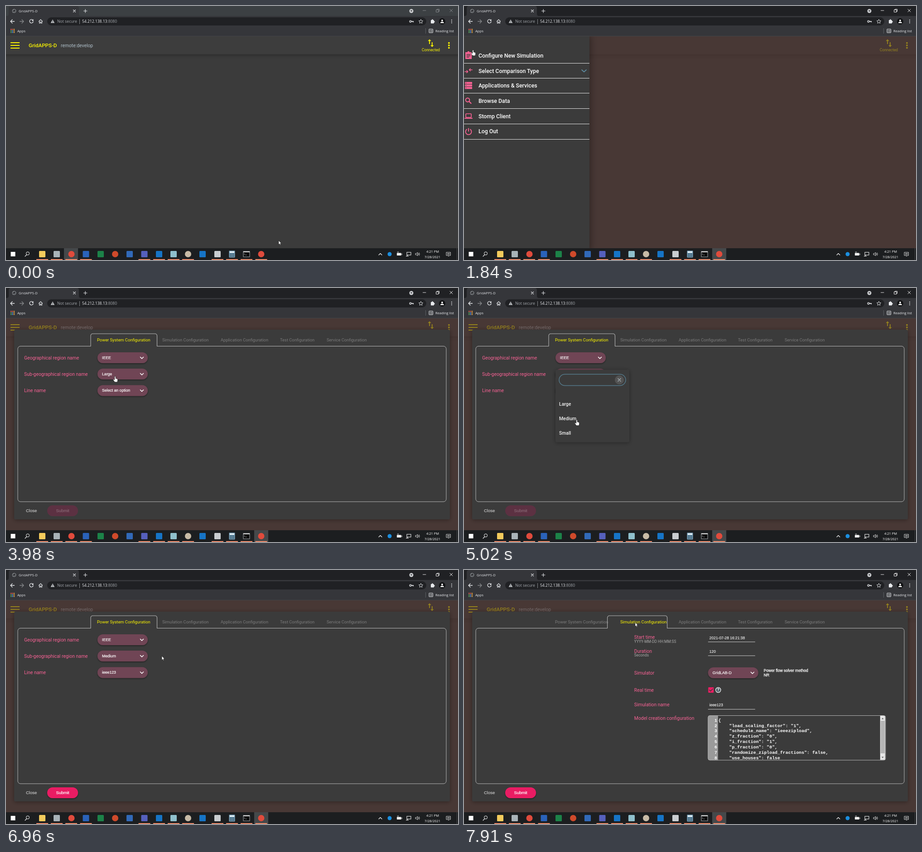
An HTML page that plays this animation: 998x561 px, repeating every 8 s.

```html
<!DOCTYPE html>
<html lang="en">
<head>
<meta charset="utf-8">
<title>Grid simulation setup</title>
<style>
  html, body { margin: 0; width: 100%; height: 100%; overflow: hidden; background: #3b3b3b; }
  svg { display: block; width: 100vw; height: 100vh; }
  text { white-space: pre; }
  .ui { font-family: "Open Sans", "Noto Sans", sans-serif; }
  .app { font-family: Roboto, sans-serif; }
  .ctl { font-family: "Liberation Sans", Arial, sans-serif; }
  .code { font-family: "Liberation Mono", monospace; font-weight: 700; }
  .line { fill: none; stroke-linecap: round; stroke-linejoin: round; }
</style>
</head>
<body>
<svg id="stage" viewBox="0 0 998 561" preserveAspectRatio="none" xmlns="http://www.w3.org/2000/svg"></svg>
<script>
const PAGE = '#3b3b3b', PINK = '#f76294', HOT = '#e91e63', YELLOW = '#fdf600', LIGHT = '#e8eaed';

// y is the vertical middle of the capitals
const text = (x, y, s, size, fill, font = 'app', extra = '') =>
  `<text class="${font}" x="${x}" y="${y + size * .36}" font-size="${size}" fill="${fill}" ${extra}>${s}</text>`;
const rect = (x, y, w, h, fill, r = 0, extra = '') =>
  `<rect x="${x}" y="${y}" width="${w}" height="${h}" rx="${r}" fill="${fill}" ${extra}/>`;
const dot = (x, y, r, fill, extra = '') => `<circle cx="${x}" cy="${y}" r="${r}" fill="${fill}" ${extra}/>`;
const line = (d, color = LIGHT, w = 1.1, extra = '') =>
  `<path class="line" d="${d}" stroke="${color}" stroke-width="${w}" ${extra}/>`;
const shape = (d, fill, extra = '') => `<path d="${d}" fill="${fill}" ${extra}/>`;
const group = (id, body, extra = '') => `<g id="${id}" ${extra}>${body}</g>`;
const bold = (color, w = .22) => `stroke="${color}" stroke-width="${w}"`;
const dots = (x, y, gap, r, fill) => [-1, 0, 1].map(i => dot(x, y + i * gap, r, fill)).join('');

function browser() {
  const grid = ['#e05a4e', '#e05a4e', '#e8a33c', '#54a65b', '#4d8fe0', '#e8a33c', '#54a65b', '#4d8fe0', '#e8a33c']
    .map((c, i) => rect(10 + i % 3 * 3.4, 50.5 + (i / 3 | 0) * 3.3, 2.3, 2.3, c)).join('');
  return `<rect id="strip" width="998" height="23"/>` +
    shape('M2 22Q6 22 6 17V5Q6 0 11 0H156Q161 0 161 5V17Q161 22 165 22Z', '#35363a') +
    rect(0, 22, 998, 45, '#35363a') + rect(0, 66.3, 998, .7, '#4a4b4e') +
    dot(18, 11, 4, 'none', 'stroke="#8c9094"') + line('M14.5 10q3-1 3.5-3M15 14q2-2 3-1t4-3', '#8c9094', .9) +
    text(28, 11, 'GridAPPS-D', 7.7, '#dfe1e5', 'ui') +
    line('M148.5 8.5l5 5m0-5l-5 5') + line('M171.5 11h7.5M175.2 7.3v7.5') +
    dot(895, 11, 4.5, '#c9cbce') + shape('M892.8 9.8h4.4l-2.2 2.8z', '#2a2b2e') +
    group('winCtl', line('M920.5 10h6.5M950 8.5h5v5h-5zM951.5 8.5v-1.5h5v5h-1.5M980 7l6 6m0-6l-6 6', 'currentColor', .9)) +
    line('M18.5 34H10M14 30l-4 4 4 4', LIGHT, 1.3) + line('M30.5 34H39M35 30l4 4-4 4', '#85878a', 1.3) +
    line('M59.3 31.2A4 4 0 1 0 60 34.5', LIGHT, 1.3) + shape('M60.5 29v4h-4z', LIGHT) +
    line('M72.5 34l4-4 4 4M73.6 33.5v4.5h2v-2.6h1.8V38h2v-4.5', LIGHT, 1.1) +
    rect(91, 25, 837, 18, '#202124', 9) +
    shape('M103 29.8l4.3 7.7h-8.6z', '#c4c7ca') + line('M103 32.5v2M103 36v.1', '#202124', .9) +
    text(113, 34, 'Not secure', 8.7, '#a5a9ae', 'ui') + rect(162, 29, 1, 11, '#85888c') +
    text(168, 34, '54.212.138.13<tspan fill="#a0a4a9">:8080</tspan>', 8.5, LIGHT, 'ui') +
    dot(893, 34, 1.9, 'none', `stroke="${LIGHT}" stroke-width="1.3"`) + line('M895 34h4.5v1.5M897.5 34v1', LIGHT, 1.3) +
    shape('M916 29.5l1.3 3 3.3.3-2.5 2.2.8 3.2-2.9-1.7-2.9 1.7.8-3.2-2.5-2.2 3.3-.3z', 'none', `stroke="${LIGHT}" stroke-width=".9"`) +
    rect(938, 31, 7, 7.5, LIGHT, 1) + dot(941.5, 30.8, 1.5, LIGHT) + dot(945.3, 34.7, 1.5, LIGHT) +
    dot(963, 34, 7, '#111214') + dot(963, 32, 1.9, '#fff') + shape('M959 37.8q0-3 4-3t4 3z', '#fff') +
    dots(984, 34, 3.3, .95, LIGHT) + grid +
    text(25, 55, 'Apps', 7.7, LIGHT, 'ui') + rect(926, 49, 1, 12, '#5a5c60') +
    rect(934, 51, 8.5, 8, 'none', .5, `stroke="${LIGHT}"`) + line('M936 53.5h.5m1.5 0h2.5M936 55.2h.5m1.5 0h2.5M936 57h.5m1.5 0h2.5', LIGHT, .8) +
    text(948, 55, 'Reading list', 7.66, LIGHT, 'ui');
}

function header() {
  return rect(-10, 67, 1018, 39.5, '#3e3e3e', 0, 'filter="url(#soft)"') +
    [80, 86, 92].map(y => rect(10, y, 20, 2, YELLOW)).join('') +
    text(50, 86.5, 'GridAPPS-D', 11.6, YELLOW, 'app', 'font-weight="500"') + text(121, 87, 'remote:develop', 10.35, '#b0c0ca') +
    shape('M9 3L5 7h3v7h2V7h3zM16 17v-7h-2v7h-3l4 4 4-4z', YELLOW, 'transform="translate(926.6 70.6) scale(.95)"') +
    text(918, 97, 'Connected', 8.35, YELLOW) + dots(978, 87, 5.3, 1.9, YELLOW);
}

const MENU = [[109.5, 'Configure New Simulation'], [143.5, 'Select Comparison Type'], [176, 'Applications &amp; Services'],
  [209.5, 'Browse Data'], [243.5, 'Stomp Client'], [277, 'Log Out']];
function drawer() {
  const icons =
    shape('M3 102h4.5a2.3 2.3 0 0 1 4.6 0H17v15H3z', PINK) + line('M6 107h8M6 110h8M6 113h5', PAGE, 1.3) +
    line('M2 145h6M6 142.5l2.5 2.5-2.5 2.5M18 141h-6M14 138.5l-2.5 2.5 2.5 2.5', PINK, 1.7) +
    [170, 175.5, 181].map(y => rect(2, y - 2.2, 16, 4.4, PINK, .8) + dot(4.5, y, .8, PAGE)).join('') +
    dot(8, 207.5, 4.3, 'none', `stroke="${PINK}" stroke-width="2"`) + line('M11.5 211l4 4', PINK, 2.3) +
    rect(4, 238, 12, 8, 'none', 1, `stroke="${PINK}" stroke-width="1.7"`) + rect(1, 247, 18, 1.9, PINK, .8) +
    line('M6 272.5a6.5 6.5 0 1 0 8 0M10 270.5v6', PINK, 1.9);
  return rect(0, 60, 277, 480, PAGE, 0, 'filter="url(#deep)"') +
    group('hover', rect(0, 93, 277, 33, '#594748') + dot(79, 109, 0, '#705f60', 'id="ripple" clip-path="url(#rowClip)"')) +
    icons + MENU.map(([y, s]) => text(32, y, s, 12.3, '#fff', 'app', 'font-weight="500"')).join('') +
    [126, 159, 192, 226, 260, 294].map(y => rect(0, y, 277, 1, '#e4e4e4')).join('') +
    line('M260 141l5 4.5 5-4.5', '#5d8ba0', 1.7);
}

const pick = (x, y, s, id = '') => rect(x, y - 12, 111, 24, '#704454', 12, 'filter="url(#lift)"') +
  text(x + 10, y - .5, s, 8.68, '#fff', 'ctl', `id="${id}" ${bold('#fff')}`) +
  line(`M${x + 94.5} ${y - 1.5}l3.5 3.5 3.5-3.5`, '#fff', 1.6);
const label = (y, s) => text(40, y, s, 10.4, PINK);
const field = (y, s) => text(206, y, s, 8.45, '#fff', 'ctl', bold('#fff', .1)) + rect(203, y + 8.8, 104, 1, '#c9c9c9');

const CODE = ['{', '    "load_scaling_factor": "1",', '    "schedule_name": "ieeezipload",', '    "z_fraction": "0",',
  '    "i_fraction": "1",', '    "p_fraction": "0",', '    "randomize_zipload_fractions": false,', '    "use_houses": false'];
function editor() {
  return rect(203, 321.5, 392, 98.5, PAGE, 4) + shape('M225 321.5H207q-4 0-4 4V416q0 4 4 4h18z', '#9a9a9a') +
    `<g clip-path="url(#codeClip)">` + CODE.map((s, i) => {
      const y = 331 + i * 11.95;
      return text(223, y, i + 1, 9.87, '#fff', 'code', 'text-anchor="end"') + text(226, y, s, 9.87, '#fff', 'code');
    }).join('') + '</g>' +
    rect(583, 322, 11, 97.5, '#e6e6e6') + rect(584, 333, 9, 72, '#b4b4b4') +
    shape('M586 329.5h5l-2.5-3zM586 412.5h5l-2.5 3z', '#666') +
    rect(203, 321.5, 392, 98.5, 'none', 4, 'stroke="#b5b5b5"');
}

function simPage() {
  return label(148.5, 'Start time') + text(40, 157.5, 'YYYY-MM-DD HH:MM:SS', 8.35, '#a9a9a9') + field(149.5, '2021-07-28 16:21:38') +
    label(179, 'Duration') + text(40, 187.5, 'Seconds', 8.35, '#a9a9a9') + field(180, '120') +
    label(227, 'Simulator') + pick(203, 227, 'GridLAB-D') +
    text(326, 222, 'Power flow solver method', 8.57, '#fff', 'ctl', bold('#fff', .3)) + text(326, 232, 'NR', 8.57, '#fff', 'ctl', bold('#fff', .3)) +
    label(265, 'Real time') + rect(203.5, 259, 12, 12, HOT, 1) + line('M206 265l2.5 2.5 5-5', PAGE, 1.4) +
    dot(225.5, 265, 5.6, '#506069', 'stroke="#fff" stroke-width="1.2"') + text(225.5, 265, '?', 8.5, '#fff', 'app', 'text-anchor="middle" font-weight="700"') +
    label(297, 'Simulation name') + field(298.3, 'ieee123') + label(327.5, 'Model creation configuration') + editor();
}

const TABS = [[201, 'Power System'], [345, 'Simulation'], [474, 'Application'], [605, 'Test'], [708, 'Service']];
function dialog() {
  const power = label(154, 'Geographical region name') + pick(202, 154, 'IEEE') +
    label(190, 'Sub-geographical region name') + pick(202, 190, 'Large', 'region') +
    label(226.5, 'Line name') + pick(202, 226.5, 'Select an option', 'feeder');
  return rect(18, 92, 962, 419, PAGE, 3, 'filter="url(#soft)"') +
    rect(26, 128.5, 946, 343.5, 'none', 6, 'stroke="#b8b8b8"') +
    `<path id="tab" fill="${PAGE}"/><path id="tabEdge" fill="none" stroke="#b8b8b8" stroke-width="1.1"/>` +
    TABS.map(([x, s], i) => text(x, 114.5, s + ' Configuration', 9.33, '#7b7b7b', 'app', `id="tab${i}"`)).join('') +
    `<g clip-path="url(#paneClip)">` + group('power', power) + group('sim', simPage()) + '</g>' +
    text(44, 492, 'Close', 9.5, '#e6e6e6', 'ctl') +
    rect(91, 480, 68, 24, '#5c3142', 12, 'id="submit"') + text(110.5, 492, 'Submit', 9.35, '#927580', 'ctl', 'id="submitText"');
}

const panel = (id, top, options) => group(id,
  rect(202, top, 163, 64 + options.length * 32, PAGE, 4, 'filter="url(#soft)"') +
  rect(210, top + 10, 147, 25, PAGE, 12.5, 'stroke="#54798a" stroke-width="1.5"') +
  dot(343, top + 22.5, 10, '#535353') + line(`M340 ${top + 19.5}l6 6m0-6l-6 6`, '#a9b4ba', 1.4) +
  options.map((s, i) => text(210, top + 75.5 + i * 32, s, 10.4, '#f2f2f2', 'app', 'font-weight="500"')).join(''));

function taskbar() {
  const square = (x, c) => rect(x - 7, 541, 14, 14, c, 1.5), ball = (x, c) => dot(x, 548, 7, c);
  const running = [80, 112, 144, 176.5, 305.5, 338, 370, 402, 467, 499, 531, 563.5];
  return rect(0, 535, 998, 26, '#1c1e20') + rect(128, 535, 31, 26, '#45484a', 0, 'id="active"') +
    rect(10.5, 543, 10, 10, '#fff') + dot(48, 546.5, 3.5, 'none', 'stroke="#fff"') + line('M45.5 549.5l-3.5 3.5', '#fff') +
    square(80, '#f3cb5c') + square(112, '#a9b3b8') + ball(144.5, '#e04b3c') + square(176.5, '#2a62b9') + square(209, '#1c8248') +
    ball(241, '#cf4a2b') + square(273, '#3169b8') + square(305.5, '#5660bd') + square(338, '#1674c6') + square(370, '#8fc0cc') +
    ball(402, '#c8bba6') + square(434, '#1674c6') + square(467, '#c9cdd0') +
    rect(492.5, 540.5, 13, 15, '#7fa9c4', 1) + rect(494, 542, 10, 3, '#e8f1f5') +
    [0, 1, 2, 3, 4, 5, 6, 7, 8].map(i => rect(494.2 + i % 3 * 3.6, 546.5 + (i / 3 | 0) * 2.9, 2.4, 1.8, '#24404f')).join('') +
    rect(524, 542, 14, 12, '#08090a', 0, 'stroke="#a9adb0"') + rect(524, 542, 14, 2, '#d6d6d6') + line('M526 547l1.5 1-1.5 1m3 .8h2', '#ddd', .7) +
    ball(563.5, '#e04b3c') + running.map(x => rect(x - 13, 559, 26, 2, '#f08d6c')).join('') +
    line('M823 550l3.5-3.5 3.5 3.5', '#fff') + dot(847, 548, 4.5, '#1b8fe0') +
    rect(863, 545.5, 9.5, 5.5, '#fff', .5) + line('M874 547v2.5M864.5 544v-1m2 1v-1', '#fff', 1) +
    rect(885, 544, 9, 6, 'none', 0, 'stroke="#fff"') + line('M883.5 552.5h5M886 550v2.5', '#fff') +
    line('M904.5 546.5h1.8l2.5-2.3v7.6l-2.5-2.3h-1.8zM910.5 546.5q1 1.5 0 3M912.3 545q2 3 0 6', '#fff', .8) +
    text(942, 542, '4:21 PM', 7.5, '#fff', 'ui', 'text-anchor="middle"') + text(941.5, 554, '7/28/2021', 7.45, '#fff', 'ui', 'text-anchor="middle"') +
    line('M972.5 544h9v7h-3l-1.5 2v-2h-4.5zM974.5 546.5h5M974.5 548.5h5', '#fff', .8) + rect(995, 535, .8, 26, '#4c4f52');
}

const clip = (id, x, y, w, h) => `<clipPath id="${id}">${rect(x, y, w, h, '#000')}</clipPath>`;
const shadow = (id, dy, blur, alpha) =>
  `<filter id="${id}" x="-20%" y="-40%" width="140%" height="200%"><feDropShadow dx="0" dy="${dy}" stdDeviation="${blur}" flood-color="#000" flood-opacity="${alpha}"/></filter>`;
const cursors = {
  arrow: shape('M0 0V8.8L2 7 3.4 10 4.7 9.4 3.4 6.4H6Z', '#fff', 'stroke="#111" stroke-width=".6"'),
  hand: shape('M-1.2 1.2a1.2 1.2 0 0 1 2.4 0V4.8l3 .6q1.3.3 1.3 1.6v2q0 2-1 3.8h-5.4q-1.5-2.6-3.3-4.6-.4-1.5 1-1.4l2 1z', '#fff', 'stroke="#111" stroke-width=".6"'),
  beam: line('M-2 -.5q2 0 2 1v7q0 1-2 1M2 -.5q-2 0-2 1v7q0 1 2 1', '#d8d8d8', .9)
};

document.getElementById('stage').innerHTML =
  '<defs>' + clip('pageClip', 0, 67, 998, 468) + clip('rowClip', 0, 93, 277, 33) + clip('paneClip', 26.5, 129, 945, 343) +
  clip('codeClip', 203, 322, 380, 97.5) + shadow('soft', 1.5, 5, .35) + shadow('deep', 4, 9, .45) + shadow('lift', 1.5, 1.5, .45) + '</defs>' +
  rect(0, 0, 998, 561, PAGE) + '<g clip-path="url(#pageClip)">' + header() +
  rect(0, 67, 998, 468, '#513631', 0, 'id="veil"') + group('dialog', dialog()) +
  panel('regionPanel', 180.5, ['Large', 'Medium', 'Small']) + panel('feederPanel', 217, ['ieee123', 'ieee123pv']) +
  group('drawer', drawer()) + '</g>' + browser() + taskbar() +
  group('cursor', Object.entries(cursors).map(([k, v]) => group(k, v)).join(''));

const $ = id => document.getElementById(id);
const set = (id, attrs) => { for (const k in attrs) $(id).setAttribute(k, attrs[k]); };
const show = (id, on) => set(id, { visibility: on ? 'visible' : 'hidden' });

// screen refreshes: first, last, count
const REFRESH = [[290, 970, 8], [1160, 1160, 1], [1460, 2240, 9], [2330, 2330, 1], [2540, 2540, 1], [2730, 3500, 9], [3590, 3780, 3],
  [3980, 4740, 9], [4830, 4830, 1], [5020, 5410, 5], [5610, 5610, 1], [5790, 6470, 8], [6660, 7440, 9], [7530, 7910, 5]];
function snap(t) {
  let out = 0;
  for (const [a, b, n] of REFRESH) if (t + 12 >= a) {
    const step = n > 1 ? (b - a) / (n - 1) : 1;
    out = a + step * Math.min(n - 1, Math.floor((t + 12 - a) / step));
  }
  return out;
}

function at(keys, t, col = 1) {
  let i = 0;
  while (i < keys.length - 1 && keys[i + 1][0] <= t) i++;
  const a = keys[i], b = keys[i + 1];
  if (!b || t <= a[0]) return a[col];
  return a[col] + (b[col] - a[col]) * (t - a[0]) / (b[0] - a[0]);
}

const POINTER = [[0, 602, 518, 'arrow'], [200, 602, 518, 'arrow'], [390, 520, 459, 'arrow'], [680, 190, 215, 'arrow'], [870, 45, 115, 'arrow'],
  [970, 20, 97, 'arrow'], [1160, 20, 97, 'hand'], [1860, 20, 97, 'hand'], [2240, 73, 107, 'hand'], [2330, 78, 107, 'hand'],
  [2540, 78, 107, 'arrow'], [3110, 78, 107, 'arrow'], [3500, 115, 128, 'arrow'], [3780, 241, 195, 'hand'], [4070, 241, 195, 'beam'],
  [4360, 241, 195, 'beam'], [4550, 246, 245, 'arrow'], [4740, 249, 291, 'arrow'], [4830, 249, 291, 'hand'], [5115, 249, 291, 'arrow'],
  [5410, 241, 232, 'arrow'], [5610, 241, 232, 'hand'], [5880, 241, 232, 'beam'], [6175, 241, 232, 'beam'], [6370, 240, 275, 'arrow'],
  [6470, 240, 289, 'hand'], [6700, 240, 289, 'arrow'], [6952, 344, 190, 'arrow'], [7440, 378, 116, 'arrow']];
const DRAWER = [[1460, -300], [1557, -190], [1655, -65], [1752, -10], [1850, 0], [2730, 0], [2826, -50], [2922, -158], [3018, -250], [3115, -300]];
const VEIL = [[1460, 0], [1557, .2], [1752, .52], [1850, .6]];
const DIALOG = [[2826, 0, .87, 17], [2922, .06, .9, 13], [3018, .5, .96, 5], [3115, .9, .99, 1], [3211, 1, 1, 0]];
const REGION = [[3980, 0], [4075, .5], [4170, .95], [4265, 1], [5020, 1], [5215, 0]];
const FEEDER = [[5790, 0], [5887, .5], [5984, .96], [6081, 1], [6660, 1], [6855, 0]];
const TAB = [[7530, 0], [7625, .12], [7720, .42], [7815, .72], [7910, .9]];
const PANE = [[7530, 0], [7625, .06], [7720, .2], [7815, .42], [7910, .645]];

function openPanel(id, keys, top, t) {
  const o = at(keys, t);
  set(id, { opacity: o, transform: `translate(0 ${top}) scale(1 ${.85 + .15 * o}) translate(0 ${-top})` });
}

function draw(time) {
  const t = snap(time), live = t >= 1460;
  set('strip', { fill: live ? '#202124' : '#3c4043' });
  $('winCtl').style.color = live ? '#fff' : '#8a8c8f';
  set('active', { x: live ? 548 : 128 });
  set('veil', { opacity: at(VEIL, t) });

  const dx = at(DRAWER, t);
  set('drawer', { transform: `translate(${dx} 0)` });
  show('drawer', dx > -299);
  show('hover', dx > -299 && t > 1950);
  set('ripple', { r: t < 2730 ? 0 : 15 + (t - 2730) * .406 });

  const scale = at(DIALOG, t, 2), drop = at(DIALOG, t, 3);
  set('dialog', { opacity: at(DIALOG, t), transform: `translate(499 ${301 + drop}) scale(${scale}) translate(-499 -301)` });
  openPanel('regionPanel', REGION, 180.5, t);
  openPanel('feederPanel', FEEDER, 217, t);
  $('region').textContent = t < 5020 ? 'Large' : 'Medium';
  $('feeder').textContent = t < 6660 ? 'Select an option' : 'ieee123';

  const ready = t >= 6740;
  set('submit', { fill: ready ? HOT : '#5c3142', filter: ready ? 'url(#lift)' : 'none' });
  set('submitText', { fill: ready ? '#fff' : '#927580', stroke: ready ? '#fff' : 'none', 'stroke-width': .22 });

  const k = at(TAB, t), left = 187 + 144 * k, right = 333.5 + 128 * k;
  const edge = `M${left} 129V106q0-5 5-5H${right - 5}q5 0 5 5V129`;
  set('tab', { d: edge + 'v.6H' + left + 'z' });
  set('tabEdge', { d: edge });
  set('tab0', { fill: t < 7530 ? YELLOW : '#7b7b7b' });
  set('tab1', { fill: t < 7530 ? '#7b7b7b' : YELLOW });
  const slide = 946 * at(PANE, t);
  set('power', { transform: `translate(${-slide} 0)` });
  set('sim', { transform: `translate(${946 - slide} 0)` });

  set('cursor', { transform: `translate(${at(POINTER, t)} ${at(POINTER, t, 2)})` });
  const kind = POINTER.filter(p => p[0] <= t).pop()[3];
  for (const c in cursors) show(c, c === kind);
}

let start;
function tick(now) {
  start ??= now;
  draw((now - start) % 8000);
  requestAnimationFrame(tick);
}
draw(0);
requestAnimationFrame(tick);
</script>
</body>
</html>
```
